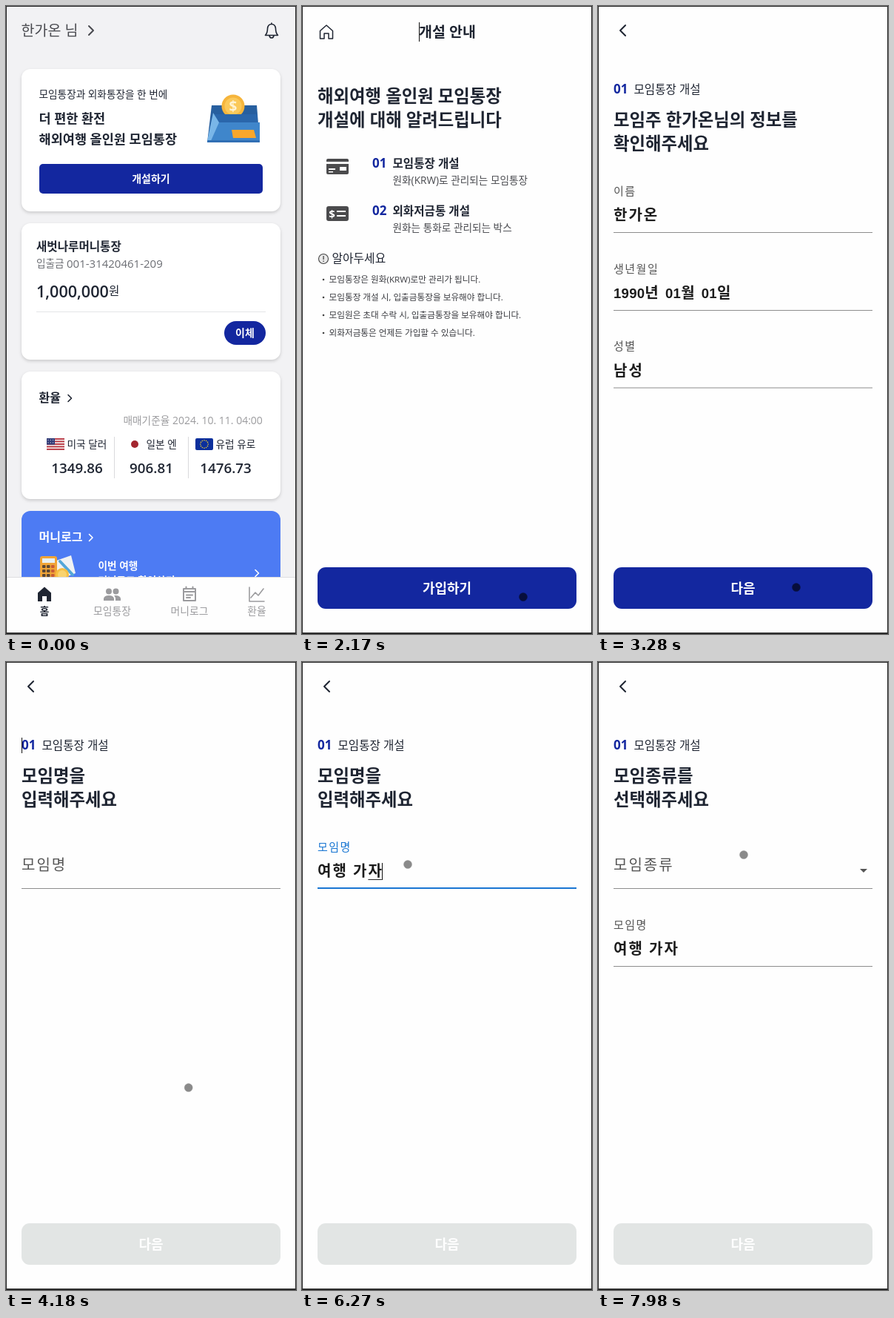
Animation of 392x847 px, one loop 8 s. Source, as an HTML page:

```html
<!DOCTYPE html>
<html lang="ko">
<head>
<meta charset="utf-8">
<title>모임통장 개설</title>
<style>
  html, body { margin: 0; width: 100%; height: 100%; overflow: hidden; background: #fefefe; }
  svg { display: block; width: 100%; height: 100%; }
  text { font-family: 'Open Sans', 'Noto Sans CJK KR', 'Noto Sans CJK', sans-serif; white-space: pre; }
  .num { font-family: 'Liberation Sans', sans-serif; font-size: 18.5px; letter-spacing: .3px; }
  .card { fill: #fff; filter: drop-shadow(0 2px 2px rgba(0,0,0,.16)); }
</style>
</head>
<body>
<svg id="stage" viewBox="0 0 392 847" xmlns="http://www.w3.org/2000/svg"></svg>
<script>
const LOOP = 8000;
const INK = '#1f2532', GRAY = '#6b6d73', PALE = '#9b9b9e', NAVY = '#13279f', BLUE = '#1976d2';
const USER = '한가온', ACCOUNT = '새벗나루머니통장';

// Markup helpers; text takes the vertical middle of its line.
const text = (x, mid, str, size, weight = 400, fill = INK, more = '') =>
  `<text x="${x}" y="${(mid + size * .37).toFixed(1)}" font-size="${size}" font-weight="${weight}" fill="${fill}" ${more}>${str}</text>`;
const center = (x, mid, str, size, weight, fill) => text(x, mid, str, size, weight, fill, 'text-anchor="middle"');
const rect = (x, y, w, h, fill, r = 0, more = '') =>
  `<rect x="${x}" y="${y}" width="${w}" height="${h}" rx="${r}" fill="${fill}" ${more}/>`;
const path = (d, fill) => `<path d="${d}" fill="${fill}"/>`;
const line = (d, stroke = INK, width = 1.6) =>
  `<path d="${d}" fill="none" stroke="${stroke}" stroke-width="${width}" stroke-linecap="round" stroke-linejoin="round"/>`;
const circle = (x, y, r, fill, more = '') => `<circle cx="${x}" cy="${y}" r="${r}" fill="${fill}" ${more}/>`;
const chevron = (x, y, s, color, width) => line(`M${x} ${y - s}l${s} ${s}l${-s} ${s}`, color, width);
const group = (id, body) => `<g id="${id}">${body}</g>`;
const list = (n, fn) => Array.from({ length: n }, (_, i) => fn(i)).join('');

const bigButton = (label, fill = NAVY) => rect(21, 757, 350, 56, fill, 11) + center(196, 785, label, 18, 700, '#fff');
const wide = 'letter-spacing="2"';
const fieldLine = y => rect(21, y, 350, 1, '#8d8d8d');
const smallLabel = (mid, str) => text(21, mid, str, 15, 300, '#555', 'letter-spacing="1.5"');
const field = (top, label, value) => smallLabel(top + 7, label) + text(21, top + 40, value, 20, 700, '#1c1c1c', wide) + fieldLine(top + 63);
const digits = n => `<tspan class="num">${n}</tspan>`;

const wallet = () =>
  path('M278 134L339 134L343 184L272 184Z', '#275f9f') +
  circle(307, 135, 15.5, '#f6b53c') + circle(307, 135, 11.5, '#fbc95a') +
  center(307, 134.5, '$', 19, 700, '#fff3d3') +
  path('M281 146L340 146L340 158L277 158Z', '#2a66ab') +
  path('M286 157L343 157L343 184L272 184Z', '#3f86cb') +
  path('M280 144L288 157L276 184L272 182Z', '#79b6e8') +
  path('M305 167H335L338 178H307Z', '#f9a72b') + rect(272, 181, 71, 3, '#316fb4', 1);

const usFlag = () => rect(55, 583, 24, 16, '#f4eeee', 2) +
  list(5, i => rect(55, 583 + i * 3.5, 24, 1.8, '#b7343f')) + rect(55, 583, 11, 8.6, '#313c78') +
  list(6, i => circle(57 + i % 3 * 3.3, 585.3 + (i > 2) * 3.5, .6, '#fff'));
const euFlag = () => rect(256, 583, 24, 16, '#0b2f9c', 2) +
  list(12, i => circle(268 + 5.2 * Math.sin(i * Math.PI / 6), 591 - 5.2 * Math.cos(i * Math.PI / 6), .8, '#f4d02f'));

const tripIcon = () =>
  path('M68 748L88 741L94 765L76 772H66Z', '#f0f2f3') + line('M73 749L90 767', '#53a7d8', 4) +
  rect(46, 742, 23, 30, '#f0a437', 3) + rect(49, 745, 17, 6, '#e8f1f5') +
  list(9, i => rect(49 + i % 3 * 6, 754 + (i / 3 | 0) * 6, 4.5, 4, i % 3 == 2 ? '#c85b37' : '#5a4634', 1)) +
  circle(76, 767, 9, '#f7bf42') + circle(76, 767, 6, '#f9d36f');

const nav = () =>
  rect(1, 770, 390, 76, '#fefefe') + rect(1, 770, 390, 1, '#dedee0') +
  path('M52 783.5L61 791.5V803H55V796H49V803H43V791.5Z', INK) +
  circle(139, 789.5, 4, PALE) + circle(148.5, 789.5, 4, PALE) +
  path('M132 802V799Q133 795 139 795Q145 795 146 799V802ZM148 795Q154 795 155 799V802H148V799Q148 797 146 795.3Z', PALE) +
  line('M240 786H256V802H240ZM240 790H256M243.5 783.5V786M252.5 783.5V786M244 794.5H252M244 798H249', PALE, 2) +
  line('M329 784V803H349M331 798L337 791L341 795L348 786', PALE, 1.6) +
  center(52, 816, '홈', 13.65, 700, INK) +
  [[143.5, '모임통장'], [248, '머니로그'], [339, '환율']].map(([x, s]) => center(x, 816, s, 13.8, 500, PALE)).join('');

const homePage = () =>
  rect(0, 0, 392, 847, '#f2f2f4') +
  text(20.5, 33, USER + ' 님', 19.5, 500, '#494a4f') + chevron(112, 33, 6, '#494a4f', 2) +
  line('M350.5 39.5H367.5Q364.5 36.5 364.5 30.5Q364 24.5 359 24.5Q354 24.5 353.5 30.5Q353.5 36.5 350.5 39.5ZM356 40Q356.5 43 359 43Q361.500 43 362 40M359 24V23') +
  rect(21, 85, 350, 192, '#fff', 12, 'class="card"') +
  text(44.5, 119, '모임통장과 외화통장을 한 번에', 13.65, 400) +
  text(44.5, 151, '더 편한 환전', 17.5, 600) + text(44.5, 179, '해외여행 올인원 모임통장', 17.55, 600) +
  wallet() + rect(45, 213, 302, 40, NAVY, 5) + center(196, 233, '개설하기', 14, 800, '#fff') +
  rect(21, 293, 350, 184, '#fff', 12, 'class="card"') +
  text(41, 324, ACCOUNT, 15.6, 600) + text(41, 347, '입출금', 13.65, 400, GRAY) +
  text(82, 347, '001-31420461-209', 15, 400, GRAY) +
  text(41, 385, '1,000,000', 21.6, 600) + text(139, 384, '원', 15.6, 400) +
  rect(41, 412, 310, 1, '#e4e5e8') + rect(295, 425, 56, 32, NAVY, 16) + center(323, 441, '이체', 14, 800, '#fff') +
  rect(21, 493, 350, 172, '#fff', 12, 'class="card"') +
  text(44.5, 528, '환율', 16, 600) + chevron(84, 529, 4.5, INK, 1.6) +
  text(158.5, 559, '매매기준율', 13.65, 400, PALE) + text(225, 559, '2024. 10. 11. 04:00', 14, 400, PALE) +
  usFlag() + circle(174, 591, 5, '#a3262f') + euFlag() +
  text(82.5, 591, '미국 달러', 13.65, 500) + text(189.5, 591, '일본 엔', 13.65, 500) + text(283.5, 591, '유럽 유로', 13.65, 500) +
  center(96, 622.5, '1349.86', 18.8, 600, INK) + center(196.5, 622.5, '906.81', 18.8, 600, INK) + center(297, 622.5, '1476.73', 18.8, 600, INK) +
  rect(146, 581, 1, 56, '#d9d9dc') + rect(246, 581, 1, 56, '#d9d9dc') +
  rect(21, 681, 350, 120, '#4d7bf3', 12) +
  text(44.5, 716, '머니로그', 16, 700, '#fff') + chevron(112.5, 717, 4.5, '#fff', 1.6) + tripIcon() +
  text(124.5, 755, '이번 여행', 13.65, 600, '#fff') + text(124.5, 775, '머니로그 확인하기', 13.65, 600, '#fff') +
  chevron(337, 765, 4.5, '#fff', 1.6) + nav();

const notes = ['모임통장은 원화(KRW)로만 관리가 됩니다.', '모임통장 개설 시, 입출금통장을 보유해야 합니다.',
  '모임원은 초대 수락 시, 입출금통장을 보유해야 합니다.', '외화저금통은 언제든 가입할 수 있습니다.'];
const step = (mid, no, title, detail) => text(95, mid, no, 17, 700, NAVY) +
  text(122.5, mid, title, 15.6, 600) + text(122.5, mid + 23, detail, 13.65, 400, '#4a4b50');

const guidePage = () =>
  line('M24.500 33.500L33 26L41.500 33.500V44H36V37H30V44H24.500Z', INK, 1.5) +
  text(158, 35, '개설 안내', 19.5, 600) + group('guideCaret', rect(158, 22, 1, 26, '#111')) +
  text(21, 121, '해외여행 올인원 모임통장', 23.4, 600) + text(21, 153, '개설에 대해 알려드립니다', 23.4, 600) +
  rect(33, 206, 30, 21, '#4b4b4d', 2) + rect(33, 210, 30, 3, '#fff') + rect(36, 219, 9, 2, '#fff') + rect(36, 223, 6, 1.5, '#fff') + rect(51, 217, 9, 5, '#fff') +
  rect(33, 270, 30, 20, '#4b4b4d', 3) + center(40.5, 280, '$', 15, 700, '#fff') + rect(47, 276, 12, 2, '#fff') + rect(47, 282, 12, 2, '#fff') +
  step(212, '01', '모임통장 개설', '원화(KRW)로 관리되는 모임통장') +
  step(276, '02', '외화저금통 개설', '원화는 통화로 관리되는 박스') +
  circle(29, 341, 6.5, '#e9e9e9', 'stroke="#444" stroke-width="1.1"') + rect(28.4, 337, 1.3, 5, '#444') + rect(28.4, 343.500, 1.3, 1.5, '#444') +
  text(40.5, 340, '알아두세요', 15.8, 500) +
  notes.map((s, i) => circle(29, 369 + i * 24, 1.3, '#444') + text(36.5, 369 + i * 24, s, 11.65, 400, '#3c3d42')).join('') +
  bigButton('가입하기') +
  group('status', path('M1 824H126Q129 824 129 827V845H1Z', '#202124') + text(5.5, 834.5, '캐시를 기다리는 중...', 12.8, 300, '#e2e3e5'));

const formHead = (first, second) =>
  line('M37 26L30 33L37 40', INK, 2) + text(21, 112, '01', 17, 700, NAVY) + text(48.5, 112, '모임통장 개설', 15.6, 500) +
  text(21, 153, first, 23.4, 600) + text(21, 185, second, 23.4, 600);

const ownerPage = () => formHead(`모임주 ${USER}님의 정보를`, '확인해주세요') +
  field(242, '이름', USER) +
  field(347, '생년월일', `${digits(1990)}년 ${digits('01')}월 ${digits('01')}일`) +
  field(451.500, '성별', '남성') + bigButton('다음');

const namePage = () => formHead('모임명을', '입력해주세요') + group('headCaret', rect(21, 102, 1, 21, '#111')) +
  '<text id="label" x="21" font-weight="300">모임명</text>' + fieldLine(305) +
  `<rect id="focus" y="304" height="2" fill="${BLUE}"/>` +
  text(21, 282, '', 20, 700, '#1c1c1c', wide + ' id="typed"') +
  '<rect id="compose" y="293" height="1" fill="#222"/>' +
  '<rect id="caret" y="271" width="1" height="23" fill="#111"/>' + bigButton('다음', '#e2e5e4');

const kindPage = () => formHead('모임종류를', '선택해주세요') +
  text(21, 274, '모임종류', 20, 300, '#555', wide) + path('M354 279H364L359 284Z', '#555') + fieldLine(305) +
  field(347, '모임명', '여행 가자') + bigButton('다음', '#e2e5e4');

const pages = [[0, homePage], [1080, guidePage], [2520, ownerPage], [3500, namePage], [6880, kindPage]];
const typing = [[0, ''], [5410, 'ㅇ'], [5480, '여'], [5680, '여ㅎ'], [5750, '여해'], [5880, '여행'],
  [5950, '여행 '], [6080, '여행 가'], [6210, '여행 갖'], [6270, '여행 가자']];
const pointer = [[400, 367, 317], [600, 285, 262], [810, 244, 234], [1080, 244, 234], [1150, 247, 234],
  [1420, 247, 234], [1620, 284, 580], [1840, 299, 797], [2450, 299, 797], [2900, 285, 790], [3280, 268, 784],
  [3600, 262, 820], [3840, 285, 791], [4040, 285, 791], [4180, 247, 575], [4450, 170, 330], [4730, 143, 273],
  [6810, 143, 273], [7180, 190, 532], [7580, 197, 283], [7650, 197, 260]];
const FOCUS = 4660;

const $ = id => document.getElementById(id);
$('stage').innerHTML = rect(0, 0, 392, 847, '#fefefe') +
  pages.map(([, draw], i) => group('page' + i, draw())).join('') +
  circle(0, 0, 5.5, '#000', 'id="pointer" stroke="#000" stroke-opacity=".4"') +
  rect(0, 0, 392, 1, '#2c2c2c') + rect(0, 0, 1, 847, '#2c2c2c') + rect(391, 0, 1, 847, '#2c2c2c') + rect(0, 845, 392, 2, '#2c2c2c');

const show = (id, on) => $(id).setAttribute('visibility', on ? 'inherit' : 'hidden');
const set = (id, attrs) => { for (const k in attrs) $(id).setAttribute(k, attrs[k]); };
const current = (table, t) => table.findLastIndex(row => row[0] <= t);
const mix = (a, b, p) => a + (b - a) * p;

function drawField(t) {
  const grow = 1 - (1 - Math.min(1, Math.max(0, (t - FOCUS) / 200))) ** 2.5;
  const size = mix(20, 15, grow);
  set('label', { 'font-size': size, y: mix(274, 249, grow) + size * .37, 'letter-spacing': size / 10, fill: t < FOCUS ? '#555' : BLUE });
  set('focus', { x: 196 - 175 * grow, width: 350 * grow });

  const typed = $('typed'), str = typing[current(typing, t)][1];
  typed.textContent = str;
  const end = str ? 19 + typed.getComputedTextLength() : 21;
  const composing = str && !str.endsWith(' ');
  const from = composing ? 21 + (str.length > 1 ? typed.getSubStringLength(0, str.length - 1) : 0) : end;
  set('compose', { x: from, width: Math.max(0, end - from) });
  set('caret', { x: Math.round(end) });
  show('caret', t >= FOCUS && t < 5210 || t >= 5410 && t < 6810);
}

function drawPointer(t) {
  const i = current(pointer, t);
  show('pointer', i >= 0);
  if (i < 0) return;
  const a = pointer[i], b = pointer[i + 1] || a;
  const p = b === a ? 0 : (t - a[0]) / (b[0] - a[0]);
  set('pointer', { cx: mix(a[1], b[1], p), cy: mix(a[2], b[2], p), opacity: t < 3500 ? .62 : .45 });
}

function render() {
  const t = performance.now() % LOOP;
  const page = current(pages, t);
  pages.forEach((_, i) => $('page' + i).setAttribute('display', i === page ? 'inline' : 'none'));
  show('guideCaret', t < 1640 || t >= 2170);
  show('status', t >= 1150 && t < 1700);
  show('headCaret', t >= 3700 && t < 4250);
  if (page === 3) drawField(t);
  drawPointer(t);
  requestAnimationFrame(render);
}
render();
</script>
</body>
</html>
```
